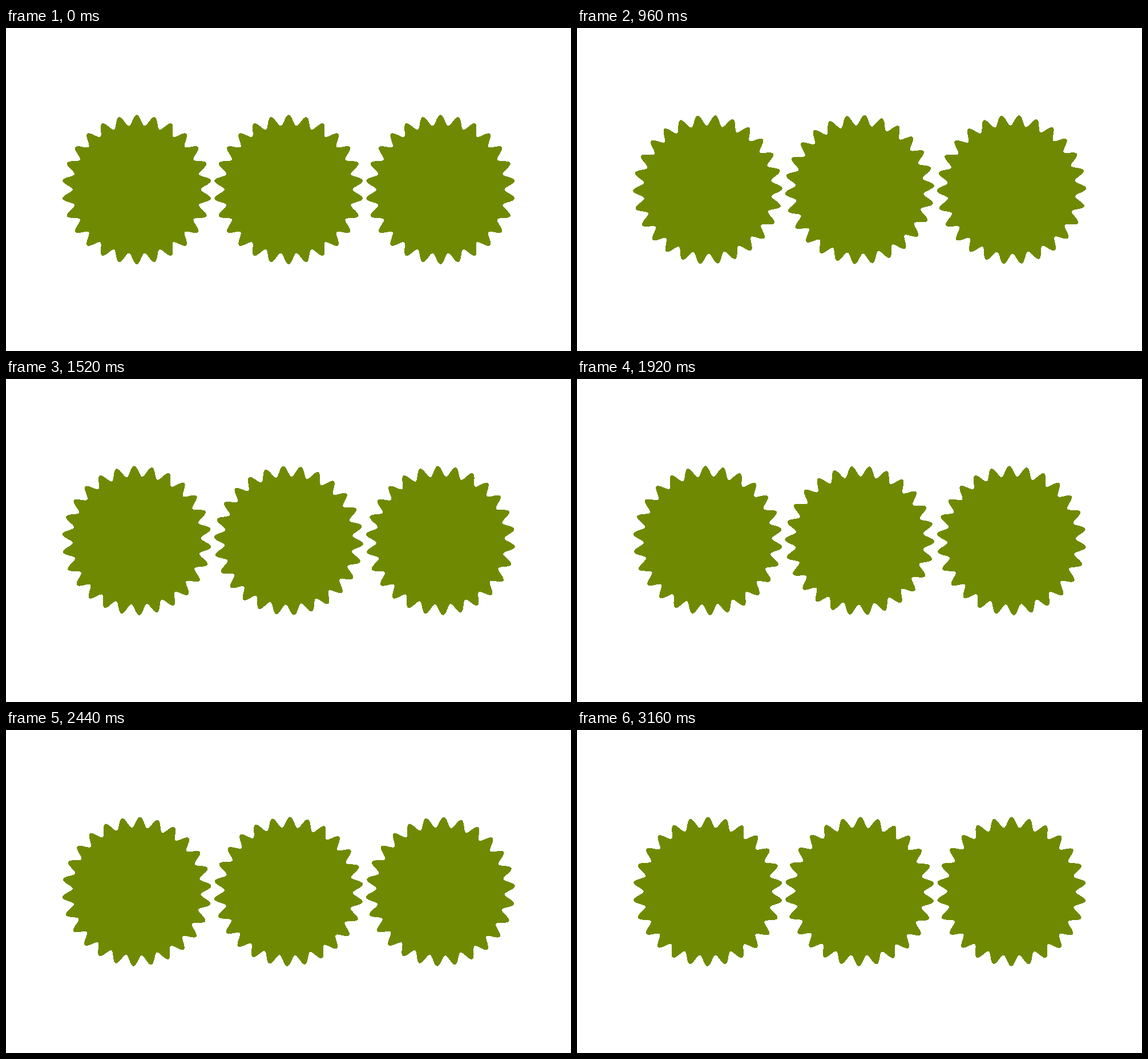
Animation, 990 px wide and 566 px high, one loop 3.2 s. Source, as an HTML page:

```html
<!DOCTYPE html>
<html lang="en">
<head>
<meta charset="utf-8">
<title>Three turning gears</title>
<style>
  html, body { margin: 0; width: 100%; height: 100%; overflow: hidden; background: #fff; }
  svg { display: block; width: 100%; height: 100%; }
</style>
</head>
<body>
<svg viewBox="0 0 990 566" fill="#6f8a02" shape-rendering="crispEdges"></svg>
<script>
const LOOP = 3200, STEP = 40;
const TEETH = 26, PITCH = 360 / TEETH;
const RADIUS = 121.6, DEPTH = 9.2;
const CENTER_Y = 283.1;

// Turn per step, in teeth
const gears = [
  { x: 229.1, turn: 0.1014 },
  { x: 495.2, turn: -0.1134 },
  { x: 761.3, turn: 0.1014 }
];

function gearPath() {
  const count = TEETH * 24;
  const points = Array.from({ length: count }, (_, i) => {
    const a = i / count * 2 * Math.PI;
    const r = RADIUS + DEPTH * Math.cos(TEETH * a);
    return `${(r * Math.sin(a)).toFixed(2)},${(-r * Math.cos(a)).toFixed(2)}`;
  });
  return `M${points.join("L")}Z`;
}

const svg = document.querySelector("svg");
const outline = gearPath();
for (const gear of gears) {
  gear.node = document.createElementNS("http://www.w3.org/2000/svg", "path");
  gear.node.setAttribute("d", outline);
  svg.append(gear.node);
}

function draw(time) {
  const step = Math.floor((time % LOOP) / STEP);
  for (const { node, x, turn } of gears) {
    node.setAttribute("transform", `translate(${x} ${CENTER_Y}) rotate(${step * turn * PITCH})`);
  }
}

let start;
function tick(now) {
  start ??= now;
  draw(Math.max(0, now - start));
  requestAnimationFrame(tick);
}
draw(0);
requestAnimationFrame(tick);
</script>
</body>
</html>
```
